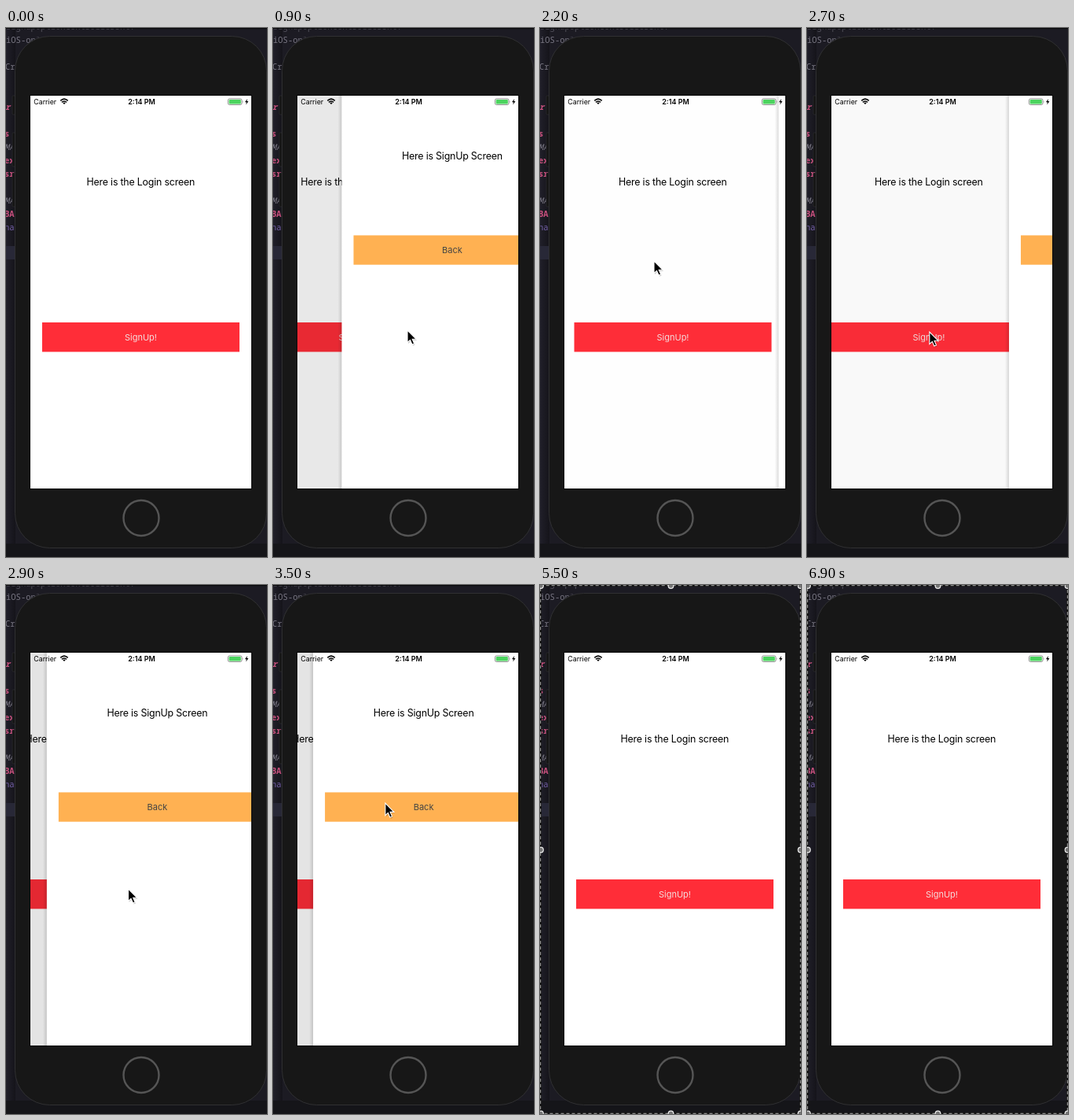
An HTML page that plays this animation: 332x672 px, repeating every 7000 ms.

```html
<!DOCTYPE html>
<html lang="en">
<head>
<meta charset="utf-8">
<title>Login and sign-up navigation</title>
<style>
  html, body { margin: 0; width: 100%; height: 100%; overflow: hidden; background: #1d1c23; }
  svg { display: block; width: 332px; height: 672px; font-family: Inter, sans-serif; }
  .code { font: 10.5px "Noto Sans Mono", monospace; fill: #777581; }
  .pink { fill: #c9517e; font-weight: 700; }
  .violet { fill: #7460a8; }
  .title { font-size: 12.4px; letter-spacing: -.2px; text-anchor: middle; }
  .label { font-size: 11px; text-anchor: middle; }
  .handles circle { fill: #777; stroke: #eee; stroke-width: 1.2; }
</style>
</head>
<body>
<svg viewBox="0 0 332 672">
  <defs>
    <clipPath id="glass"><rect x="31" y="86" width="281" height="499"/></clipPath>
    <linearGradient id="edge">
      <stop offset="0" stop-opacity="0"/><stop offset="1" stop-opacity=".14"/>
    </linearGradient>
    <linearGradient id="side">
      <stop offset="0" stop-color="#201f29"/><stop offset="1" stop-color="#15141a"/>
    </linearGradient>
  </defs>

  <rect width="332" height="672" fill="#1c1b23"/>
  <rect width="12" height="672" fill="url(#side)"/>
  <rect y="277" width="12" height="17" fill="#282837"/>
  <rect y="655" width="332" height="17" fill="#151519"/>
  <g class="code">
    <text x="0" y="2" fill-opacity=".6">SignupOptionControllerInt.</text>
    <text x="0" y="19">iOS-on</text>
    <text x="38" y="19" fill-opacity=".35">ly initialized</text>
    <text x="-1" y="53">Cr</text>
    <text x="-1" y="104" class="pink" font-style="italic">r</text>
    <text x="-2" y="138" class="pink">s</text>
    <text x="-2" y="155" font-style="italic">MA</text>
    <text x="-2" y="172" class="pink">ex</text>
    <text x="-2" y="189" class="pink">sr</text>
    <text x="-2" y="223" font-style="italic">MA</text>
    <text x="-2" y="240" class="pink">BA</text>
    <text x="-2" y="257" class="violet">na</text>
  </g>
  <rect width="332" height="1.2" fill="#08080a"/>

  <g fill="#151515" stroke="#303033" stroke-width=".6">
    <rect x="8" y="86" width="6" height="24" rx="1"/>
    <rect x="8" y="133" width="6" height="43" rx="1"/>
    <rect x="8" y="184" width="6" height="43" rx="1"/>
  </g>
  <rect x="11.5" y="10.5" width="320" height="650" rx="44" fill="#171717" stroke="#303032"/>
  <rect x="30" y="85" width="283" height="501" fill="#070707"/>
  <circle cx="172" cy="622.5" r="22.5" fill="#171717" stroke="#555" stroke-width="2.4"/>

  <g clip-path="url(#glass)">
    <g id="login">
      <rect x="31" y="86" width="281" height="499" fill="#fff"/>
      <text class="title" x="171.3" y="200">Here is the Login screen</text>
      <rect x="46" y="374" width="251" height="37.4" fill="#ff2d38"/>
      <text class="label" x="171.5" y="397" fill="#f4dddd">SignUp!</text>
    </g>
    <rect id="dim" x="31" y="86" width="281" height="499"/>
    <g id="signup">
      <rect x="26" y="86" width="5" height="499" fill="url(#edge)"/>
      <rect x="31" y="86" width="281" height="499" fill="#fff"/>
      <text class="title" x="171.5" y="167">Here is SignUp Screen</text>
      <rect x="46" y="263.4" width="251" height="37.3" fill="#ffb152"/>
      <text class="label" x="171.5" y="286" fill="#444">Back</text>
    </g>
  </g>

  <text x="35.3" y="97" font-size="8.8">Carrier</text>
  <text x="172.5" y="97" font-size="9" font-weight="600" text-anchor="middle">2:14 PM</text>
  <g fill="none" stroke="#000" stroke-width="1.6">
    <path d="M69.3 92.3Q74 87.8 78.7 92.3M71 94.4Q74 91.6 77 94.4"/>
    <path d="M72.3 95.3Q74 93.8 75.7 95.3L74 97Z" fill="#000" stroke="none"/>
  </g>
  <rect x="282.4" y="89.9" width="17.6" height="7.6" rx="2" fill="#fff" stroke="#777" stroke-width=".8"/>
  <rect x="283.6" y="91" width="15.2" height="5.4" rx="1" fill="#4cd45f"/>
  <path d="M300.9 92.2Q302 93.7 300.9 95.2Z" fill="#777"/>
  <path d="M307 90L303.9 94.2H305.9L305.2 97.4L308.4 93H306.4Z"/>

  <g id="cursor">
    <path d="M1 1.5V17L4.5 13.8L7 19.5L9.6 18.4L7.2 12.7H12Z" fill-opacity=".2"/>
    <path d="M0 0V15.5L3.5 12.3L6 18L8.6 16.9L6.2 11.2H11Z" stroke="#fff" stroke-width="1.1"/>
  </g>

  <g id="selection">
    <path d="M0 0H332V672H0Z" fill="none" stroke="#111" stroke-width="4"/>
    <path d="M.7 .7H331.3V671.3H.7Z" fill="none" stroke="#aaa" stroke-dasharray="4 3"/>
    <g class="handles">
      <circle cx="1" cy="1" r="3.3"/><circle cx="166.5" cy="1" r="3.3"/><circle cx="331.5" cy="1" r="3.3"/>
      <circle cx="1" cy="336.5" r="3.3"/><circle cx="331.5" cy="336.5" r="3.3"/>
      <circle cx="1" cy="671.5" r="3.3"/><circle cx="166.5" cy="671.5" r="3.3"/><circle cx="331.5" cy="671.5" r="3.3"/>
    </g>
  </g>
</svg>
<script>
  const LOOP = 7000, STEP = 100, SLIDE = 540, WIDTH = 281;
  const CURSOR_IN = 300, CURSOR_OUT = 5500, SELECT_AT = 5100;
  // Pushes and pops alternate.
  const slides = [735, 1870, 2650, 3480];
  // Pointer stops: time, x, y
  const stops = [
    [300, 6, 372], [600, 170, 390], [700, 171, 384], [950, 171, 384],
    [1500, 150.5, 311.5], [1800, 147, 293], [2000, 145, 296], [2250, 145, 296],
    [2550, 156, 386], [2950, 155.5, 386], [3400, 143, 278], [4000, 141, 266.5],
    [5000, 141, 266.5], [5100, 134, 279]
  ];
  const [login, dim, signup, cursor, selection] =
    ["login", "dim", "signup", "cursor", "selection"].map(id => document.getElementById(id));

  const clamp = v => Math.min(1, Math.max(0, v));
  const bezier = (a, b, s) => 3 * (1 - s) ** 2 * s * a + 3 * (1 - s) * s * s * b + s ** 3;

  // Steep start and long settling tail, solved by bisection.
  function settle(x) {
    if (x <= 0 || x >= 1) return clamp(x);
    let lo = 0, hi = 1;
    for (let i = 0; i < 24; i++) {
      const mid = (lo + hi) / 2;
      if (bezier(.36, .04, mid) < x) lo = mid; else hi = mid;
    }
    return bezier(.66, 1, lo);
  }

  function pointerAt(t) {
    const next = stops.findIndex(stop => stop[0] > t);
    if (next < 0) return stops[stops.length - 1].slice(1);
    const [t0, x0, y0] = stops[Math.max(0, next - 1)], [t1, x1, y1] = stops[next];
    const u = clamp((t - t0) / (t1 - t0 || 1)), k = u * u * (3 - 2 * u);
    return [x0 + (x1 - x0) * k, y0 + (y1 - y0) * k];
  }

  const move = (node, x, y = 0) => node.setAttribute("transform", `translate(${x} ${y})`);
  const show = (node, on) => node.setAttribute("visibility", on ? "visible" : "hidden");

  function draw(now) {
    const t = Math.floor(now % LOOP / STEP) * STEP;
    const pushed = slides.reduce(
      (sum, start, i) => sum + (i % 2 ? -1 : 1) * settle((t - start) / SLIDE), 0);
    move(login, -.3 * WIDTH * pushed);
    dim.setAttribute("opacity", .115 * clamp(pushed));
    move(signup, WIDTH * (1 - pushed));
    show(signup, pushed > .001);
    move(cursor, ...pointerAt(t));
    show(cursor, t >= CURSOR_IN && t < CURSOR_OUT);
    show(selection, t >= SELECT_AT);
  }

  const began = performance.now();
  function tick() {
    draw(performance.now() - began);
    requestAnimationFrame(tick);
  }
  tick();
</script>
</body>
</html>
```
